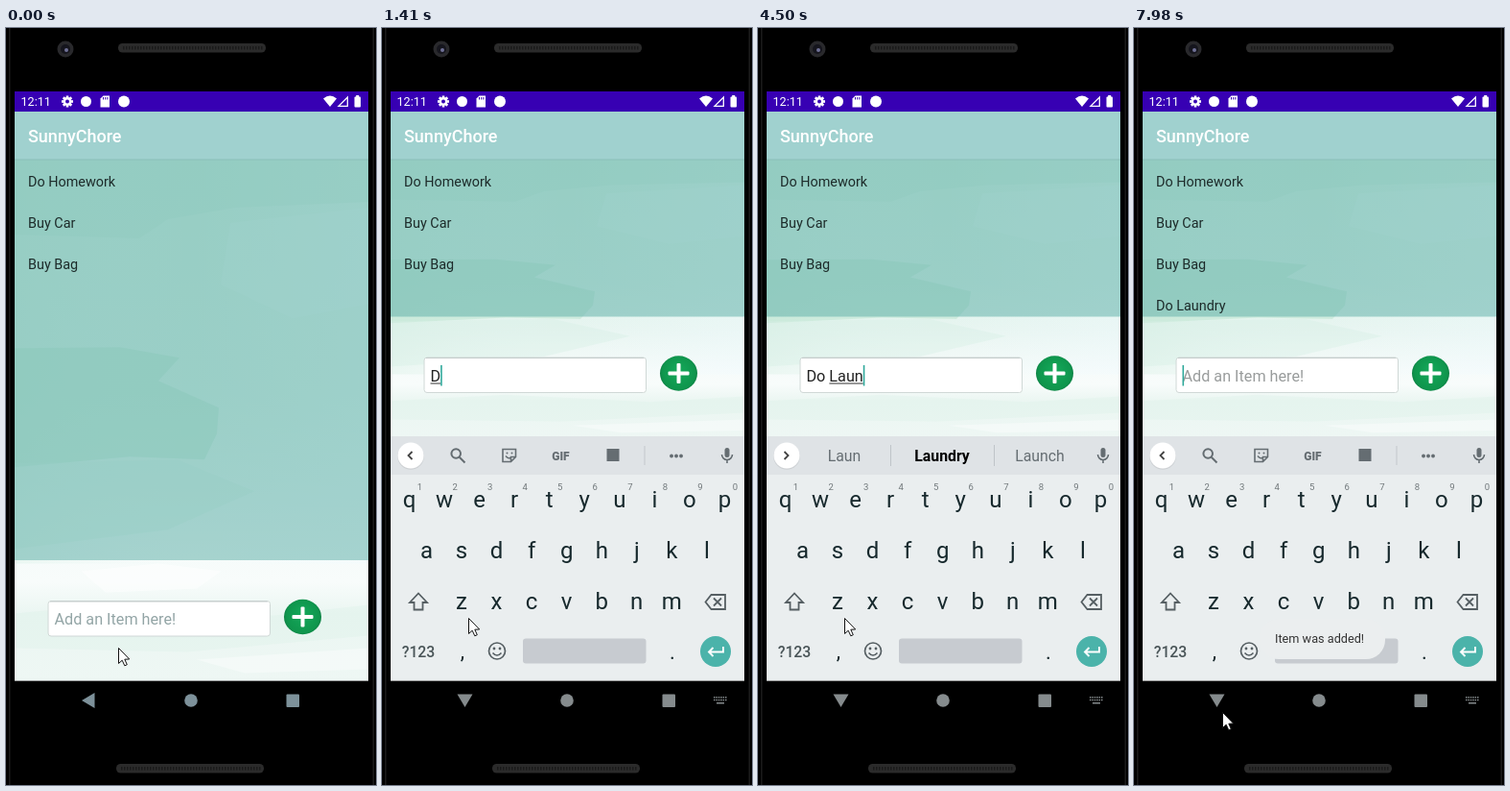
Recreate the animation shown at these times as an HTML page with a canvas. Size 386 by 788 pixels, loop 8 s.

```html
<!DOCTYPE html>
<html lang="en">
<head>
<meta charset="utf-8">
<title>Todo list</title>
<style>
html, body { margin: 0; width: 100%; height: 100%; overflow: hidden; background: #000; }
canvas { display: block; width: 386px; height: 788px; }
</style>
</head>
<body>
<canvas id="stage"></canvas>
<script>
const W = 386, H = 788, LOOP = 8000;
const canvas = document.getElementById('stage');
const dpr = window.devicePixelRatio || 1;
canvas.width = W * dpr;
canvas.height = H * dpr;
const g = canvas.getContext('2d');

// time, typed text, start of the underlined word (-1: none), suggestions
const typing = [
  [0, '', -1, ''],
  [1410, 'D', 0, ''],
  [1480, 'D', 0, 'D|Do|Don\'t'],
  [2200, '', -1, 'D|Do|Don\'t'],
  [2390, '', -1, ''],
  [2720, 'D', 0, ''],
  [2810, 'D', 0, 'D|Do|Don\'t'],
  [2970, 'Do', 0, 'Do|Don\'t|Does'],
  [3120, 'Do ', -1, 'you|not|something'],
  [3350, 'Do L', 3, 'you|not|something'],
  [3430, 'Do L', 3, 'L|Let|Love'],
  [4120, 'Do La', 3, 'La|Last|Later'],
  [4270, 'Do Lau', 3, 'Lau|*Laugh|Laurel'],
  [4500, 'Do Laun', 3, 'Laun|*Laundry|Launch'],
  [4670, 'Do Laund', 3, 'Laund|*Laundry|Laundromat'],
  [4900, 'Do Laundr', 3, 'Laundr|*Laundry|Laundromat'],
  [4980, 'Do Laundry', 3, 'Laundry|Laundry I|Laundry\'s'],
  [6600, '', -1, 'Laundry|Laundry I|Laundry\'s'],
  [6680, '', -1, '']
];
// each time flips the caret
const blinks = [480, 1880, 2200, 3890, 4120, 5510, 6010, 6430, 6600, 7110, 7600];
// time, x, y of the pointer tip
const path = [
  [0, 117, 645], [230, 90, 614], [5430, 90, 614], [5890, 330, 399], [6280, 310, 358],
  [7130, 310, 358], [7360, 237, 480], [7700, 102, 735], [7980, 92, 712]
];

const clamp = v => Math.max(0, Math.min(1, v));

function pointer(t) {
  const i = path.findIndex(p => p[0] > t);
  if (i < 0) return path[path.length - 1].slice(1);
  const [a, b] = [path[i - 1], path[i]];
  const k = (t - a[0]) / (b[0] - a[0]), e = k * k * (3 - 2 * k);
  return [a[1] + (b[1] - a[1]) * e, a[2] + (b[2] - a[2]) * e];
}

function rect(x, y, w, h, fill, r = 0) {
  g.fillStyle = fill;
  g.beginPath();
  g.roundRect(x, y, w, h, r);
  g.fill();
}
function disc(x, y, r, fill) {
  g.fillStyle = fill;
  g.beginPath();
  g.arc(x, y, r, 0, 7);
  g.fill();
}
function poly(pts, fill) {
  g.fillStyle = fill;
  g.beginPath();
  for (let i = 0; i < pts.length; i += 2) g.lineTo(pts[i], pts[i + 1]);
  g.closePath();
  g.fill();
}
function line(d, color, width = 1.6) {
  g.strokeStyle = color;
  g.lineWidth = width;
  g.stroke(new Path2D(d));
}
function text(s, x, y, size, fill, align = 'left', weight = 400) {
  g.font = `${weight} ${size}px Roboto, sans-serif`;
  g.textAlign = align;
  g.fillStyle = fill;
  g.fillText(s, x, y);
}

function phone() {
  rect(0, 0, W, H, '#000');
  rect(3, 0, 1.5, H, '#1b1b1b');
  rect(382.5, 0, 1.5, H, '#1b1b1b');
  disc(62, 22, 8.5, '#29292c');
  disc(62, 22, 5, '#15151d');
  disc(63, 23, 2, '#6f7196');
  for (const [x, y] of [[117, 16], [115, 766]]) {
    rect(x, y, 154, 9.5, '#2b2b2b', 4.5);
    for (let i = 5; i < 150; i += 3) rect(x + i, y + 3, 1.5, 3.5, '#1a1a1a');
  }
}

function bars() {
  rect(9, 66, 369, 21, '#3700b3');
  const white = '#fff';
  text('12:11', 15.5, 81, 12.6, white);
  g.save();
  g.translate(64, 76.5);
  for (let i = 0; i < 4; i++) {
    rect(-1.3, -6, 2.6, 12, white);
    g.rotate(Math.PI / 4);
  }
  g.restore();
  disc(64, 76.5, 4.4, white);
  disc(64, 76.5, 2, '#3700b3');
  disc(83.5, 76.5, 5.5, white);
  poly([101.5, 70.5, 108, 70.5, 108, 82.5, 98.5, 82.5, 98.5, 73.5], white);
  for (const x of [101, 103.2, 105.4]) rect(x, 72, 1, 2.5, '#3700b3');
  disc(123, 76.5, 6, white);
  g.fillStyle = white;
  g.fill(new Path2D('M331 73.5Q338 67.5 345 73.5L338 82Z'));
  line('M347 81.3H356.3V72Z', white, 1.3);
  rect(363.5, 71.5, 6.5, 11, white, 1);
  rect(365.2, 70, 3, 2, white);

  rect(9, 87, 369, 50, '#a0d1cf');
  text('SunnyChore', 23, 119, 18, white, 'left', 500);
}

// The watercolour stretches to the height it is given
function wash(height) {
  g.save();
  g.beginPath();
  g.rect(9, 137, 369, height);
  g.clip();
  g.translate(9, 137);
  g.scale(1, height / 542);
  const base = g.createLinearGradient(0, 0, 0, 542);
  [[0, '#d6f0e2'], [.45, '#ddf2e9'], [.62, '#e8f5f1'], [.76, '#f6fbfa'], [.81, '#f8fcfb'], [.87, '#ebf6f2'], [1, '#eef7f4']]
    .forEach(s => base.addColorStop(...s));
  rect(0, 0, 369, 542, base);
  const side = g.createLinearGradient(0, 0, 369, 0);
  side.addColorStop(0, 'rgba(205,236,221,.3)');
  side.addColorStop(.5, 'rgba(240,250,252,0)');
  side.addColorStop(1, 'rgba(240,250,254,.4)');
  rect(0, 0, 369, 420, side);
  poly([0, 0, 369, 0, 369, 44, 230, 50, 160, 62, 130, 82, 0, 78], 'rgba(190,228,210,.3)');
  poly([225, 66, 369, 50, 369, 150, 290, 165, 215, 130], 'rgba(240,250,252,.2)');
  poly([0, 196, 110, 195, 172, 206, 150, 230, 213, 258, 211, 285, 198, 312, 120, 309, 0, 320], 'rgba(186,228,206,.5)');
  poly([0, 316, 170, 312, 250, 345, 160, 385, 0, 405], 'rgba(213,237,227,.4)');
  poly([70, 428, 150, 420, 215, 428, 190, 446, 95, 450], 'rgba(255,255,255,.5)');
  poly([0, 472, 120, 460, 270, 474, 369, 463, 369, 495, 180, 512, 0, 508], 'rgba(214,238,229,.3)');
  poly([190, 520, 369, 508, 369, 530, 240, 534], 'rgba(255,255,255,.35)');
  g.restore();
}

function addButton(x, y, pressed) {
  const fill = g.createRadialGradient(x, y - 3, 4, x, y, 20);
  fill.addColorStop(0, pressed ? '#118f49' : '#13a457');
  fill.addColorStop(.8, pressed ? '#0e8444' : '#0f964d');
  fill.addColorStop(1, '#0c7f43');
  g.fillStyle = fill;
  g.beginPath();
  g.ellipse(x, y, 19.5, 18.2, 0, 0, 7);
  g.fill();
  rect(x - 11, y - 2, 22, 4, '#fff', 1);
  rect(x - 2, y - 10.5, 4, 21, '#fff', 1);
}

function content(t, open, state) {
  const shift = open ? 253.5 : 0, end = open ? 300.5 : 554;
  rect(9, 137, 369, 542.5, '#fafbfb');
  wash(open ? 288.5 : 542.5);
  rect(9, 137, 369, end - 137, 'rgba(100,178,172,.55)');
  rect(9, 136.5, 369, 1, '#8bbfb9');
  const items = ['Do Homework', 'Buy Car', 'Buy Bag'];
  if (t >= 6600) items.push('Do Laundry');
  items.forEach((s, i) => text(s, 23, 164.5 + 43 * i, 14.4, '#1d2b2a'));

  const top = 596.5 - shift, base = 621 - shift;
  g.lineWidth = 1;
  g.strokeStyle = '#d0d8d6';
  rect(44, top, 231.5, 36.5, '#fff', 3);
  g.stroke();
  rect(46, top, 227, 1, '#c4cccb');
  const [, typed, from] = state;
  const x = 50.5;
  text(typed || 'Add an Item here!', x, base, 16.2, typed ? '#222' : open ? '#999c9c' : '#93a5a6');
  const width = s => g.measureText(s).width;
  if (from >= 0) {
    const a = width(typed.slice(0, from));
    rect(x + a, base + 2, width(typed) - a, 1, '#333');
  }
  if (blinks.filter(b => b <= t).length % 2)
    rect(x + (typed ? width(typed) : 0), top + 8, 1.6, 21.5, '#2fa99b');
  addButton(309.5, 613 - shift, t >= 6430 && t < 7200);
}

function strip(words) {
  const ink = '#656d72';
  rect(9, 425, 369, 40, '#dfe3e6');
  disc(30, 446, 13.8, 'rgba(0,0,0,.08)');
  disc(30, 445, 13.5, '#fff');
  line(words ? 'M27.5 441l4 4-4 4' : 'M31.5 441l-4 4 4 4', '#444', 1.8);
  if (words) {
    words.split('|').forEach((w, i) => {
      const bold = w[0] === '*';
      text(bold ? w.slice(1) : w, 90 + 102 * i, 451, 15.8, bold ? '#000' : ink, 'center', bold ? 700 : 400);
    });
    for (const x of [138, 246]) rect(x, 434, 1, 22, '#bfc4c8');
  } else {
    line('M82 443a4.8 4.8 0 1 1-9.6 0a4.8 4.8 0 1 1 9.6 0M81 447l5.5 5.5', ink, 2);
    line('M126 438.5h13.5v8l-5 5H126ZM134.5 451.5v-5h5M129 445.5q3.5 4 6 1', ink);
    disc(130.5, 442.5, 1, ink);
    disc(135.5, 442.5, 1, ink);
    text('GIF', 186.5, 449.5, 12, ink, 'center', 900);
    rect(234.5, 438, 13, 13, ink);
    rect(273.5, 435, 1, 20, '#c3c8cb');
    for (const x of [302, 307, 312]) disc(x, 445.5, 1.9, ink);
  }
  rect(357.5, 437, 5, 10, ink, 2.5);
  line('M354.5 444a5.5 5.5 0 0 0 11 0M360 449.5v3.5', ink);
}

function keyboard(words) {
  const ink = '#17292d', grey = '#565f63';
  rect(9, 465, 369, 214.5, '#eaeeef');
  strip(words);
  const row = (keys, x, y) => [...keys].forEach((k, i) => text(k, x + 36.55 * i, y, 24, ink, 'center'));
  row('qwertyuiop', 28.5, 499);
  row('asdfghjkl', 46.5, 552);
  row('zxcvbnm', 83, 605);
  [...'1234567890'].forEach((d, i) => text(d, 39.5 + 36.55 * i, 481, 9.5, '#70777a', 'center'));
  line('M38 588.5l9 9.5h-4.5v7.5h-9V598H29Z', grey, 1.8);
  line('M337.5 597.5l6-7.5h14.5v15h-14.5ZM346 593.5l8 8M354 593.5l-8 8', grey, 1.8);
  text('?123', 38, 654.5, 15.8, '#4a5558', 'center', 500);
  text(',', 84, 656, 22, ink, 'center');
  text('.', 303, 657, 22, ink, 'center');
  line('M128.5 648.5a8.5 8.5 0 1 1-17 0a8.5 8.5 0 1 1 17 0M115.5 650.5q4.5 5 9 0', grey, 1.7);
  disc(117, 646, 1.4, grey);
  disc(123, 646, 1.4, grey);
  rect(147, 635.5, 128.5, 26, '#c7cbd0', 3);
  disc(348, 649, 16, '#4bb3aa');
  line('M356 644v5.5H341.5M345.5 645l-4.5 4.5 4.5 4.5', '#fff', 1.9);
}

function toast(t) {
  g.globalAlpha = clamp((t - 6600) / 400);
  rect(131, 615, 131, 42, '#ebeeef', 20);
  text('Item was added!', 147, 640, 12.7, '#333');
  g.globalAlpha = 1;
}

function navBar(open, turn, light) {
  const ink = light ? '#c9cbcc' : open ? '#858b8d' : '#7d919a';
  g.save();
  g.translate(87 - turn * .5, 700 - turn);
  g.rotate(-turn * Math.PI / 2);
  poly([-8, 0, 5.5, -8, 5.5, 8], ink);
  g.restore();
  disc(193, 700, 6.8, ink);
  rect(292.5, 693.5, 13.5, 13.5, ink, 1);
  if (!open) return;
  for (let y = 0; y < 2; y++)
    for (let i = 0; i < 6; i++) rect(346 + i * 2.4, 696 + y * 2.8, 1.5, 1.5, ink);
  rect(349, 702, 8, 1.5, ink);
}

function arrow(x, y) {
  g.save();
  g.translate(x + .5, y + .5);
  poly([0, 0, 0, 16, 3.7, 12.7, 6.3, 18.3, 8.8, 17.2, 6.3, 11.7, 11.2, 11.5], '#fff');
  g.strokeStyle = '#111';
  g.lineWidth = 1;
  g.stroke();
  g.restore();
}

function draw(t) {
  const state = typing.filter(s => s[0] <= t).pop();
  const open = t >= 860;
  const step = Math.min(3, Math.floor((t - 860) / 76));
  const drop = open ? [27, 10, 3, 0][step] : 0;
  phone();
  bars();
  content(t, open, state);
  if (open) {
    g.save();
    g.beginPath();
    g.rect(9, 137, 369, 542.5 + drop);
    g.clip();
    if (drop) rect(9, 679, 369, drop, '#fafbfb');
    g.translate(0, drop);
    g.globalAlpha = [.72, .88, .96, 1][step];
    keyboard(state[3]);
    g.restore();
    if (drop) rect(9, 679, 369, drop, 'rgba(0,0,0,.36)');
    if (t >= 6600) toast(t);
  }
  navBar(open, open ? [.58, .85, .96, 1][step] : 0, drop > 20);
  arrow(...pointer(t));
}

function frame(now) {
  g.setTransform(dpr, 0, 0, dpr, 0, 0);
  draw(now % LOOP);
  requestAnimationFrame(frame);
}
requestAnimationFrame(frame);
</script>
</body>
</html>
```
